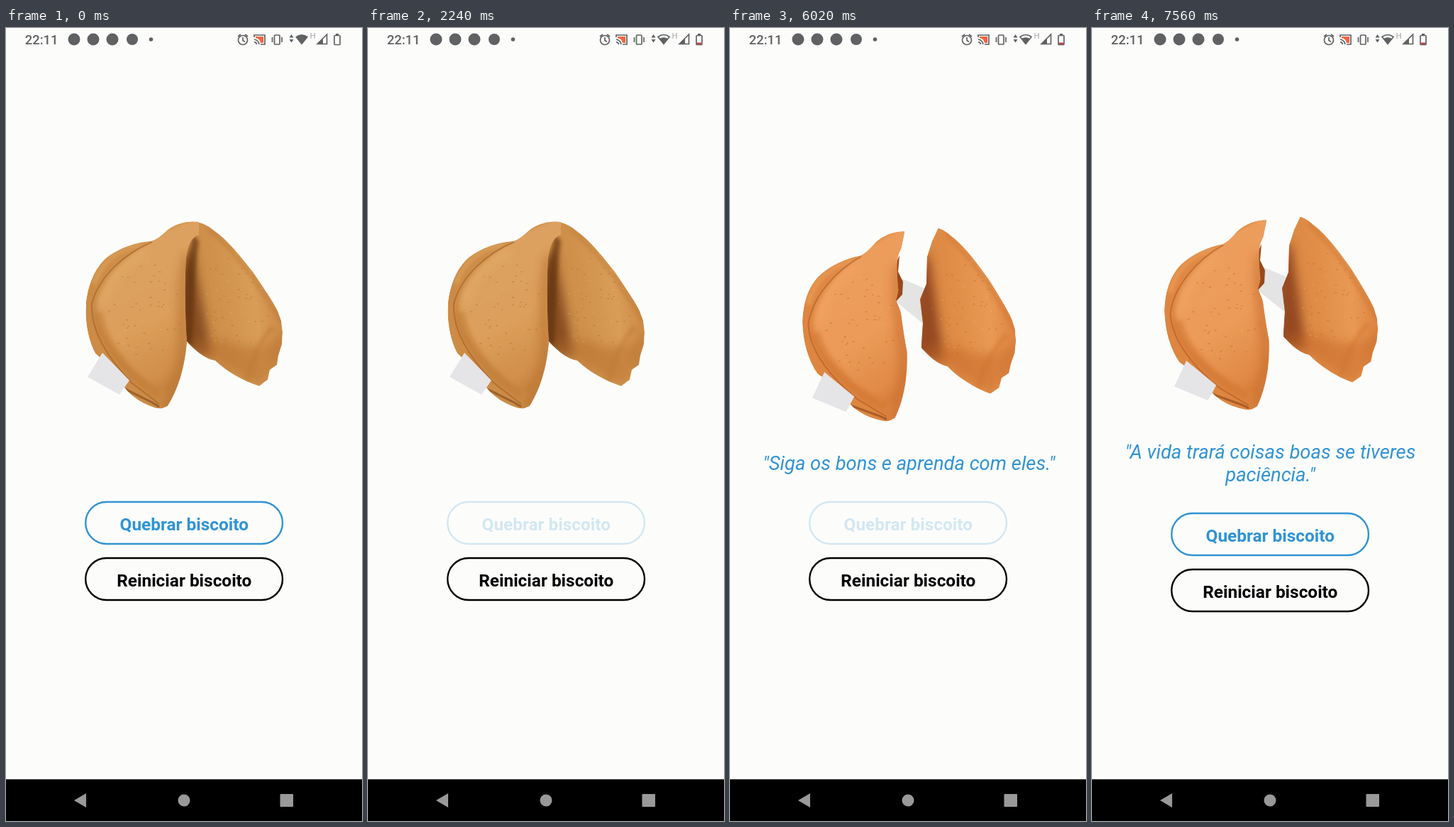
Recreate the animation shown at these times as an HTML page. Size 502x1116 px, loop 8000 ms.

```html
<!DOCTYPE html>
<html lang="pt">
<head>
<meta charset="utf-8">
<title>Biscoito</title>
<style>
  html, body { margin: 0; width: 100%; height: 100%; overflow: hidden; background: #fcfdfb; }
  svg { display: block; width: 100vw; height: 100vh; font-family: Roboto, sans-serif; }
  text { text-anchor: middle; }
  .label { font-size: 24.4px; font-weight: 700; stroke: none; }
  .quote { font-size: 27.4px; font-style: italic; fill: #3093d3; }
  .button rect { fill: none; stroke: currentColor; stroke-width: 2.4; }
  .button text { fill: currentColor; }
  .line { fill: none; stroke: #5f6163; stroke-width: 1.7; }
  #broken { filter: hue-rotate(-6deg) saturate(1.14); }
</style>
</head>
<body>
<svg viewBox="0 0 502 1116">
  <defs>
    <linearGradient id="leftTone" gradientUnits="userSpaceOnUse" x1="150" y1="330" x2="245" y2="520">
      <stop offset="0" stop-color="#dca160"/>
      <stop offset=".45" stop-color="#dc9f5c"/>
      <stop offset=".8" stop-color="#d08f4b"/>
      <stop offset="1" stop-color="#c07a35"/>
    </linearGradient>
    <linearGradient id="rightTone" gradientUnits="userSpaceOnUse" x1="254" y1="390" x2="389" y2="370">
      <stop offset="0" stop-color="#c98a47"/>
      <stop offset=".35" stop-color="#cf914b"/>
      <stop offset=".7" stop-color="#d99d58"/>
      <stop offset="1" stop-color="#ca8743"/>
    </linearGradient>
    <filter id="soft" x="-50%" y="-50%" width="200%" height="200%"><feGaussianBlur stdDeviation="7"/></filter>
    <filter id="crisp" x="-50%" y="-50%" width="200%" height="200%"><feGaussianBlur stdDeviation="2.5"/></filter>

    <path id="leftShape" d="M205 300C185 301 160 309 142 323C124 339 116 362 113 385C111 412 115 437 126 458L136 467L172 512Q185 525 203 532Q215 537 221 535L228 532C243 507 252 480 255 441C252 400 252 350 254 325C256 305 262 294 272 291V273C255 271 240 275 228 284Q215 297 205 300Z"/>
    <path id="rightShape" d="M262 273C275 272 285 278 292 284C314 299 331 322 348 343C363 365 376 384 383 398L388 412L390 428L389 445L384 461L382 474L372 481L369 495L357 504C335 497 310 483 295 468C280 466 265 452 255 441C250 420 247 350 250 320Q256 295 258 275Z"/>
    <clipPath id="leftClip"><use href="#leftShape"/></clipPath>
    <clipPath id="rightClip"><use href="#rightShape"/></clipPath>
    <clipPath id="leftCrack"><path d="M0 200H250L246 287L239 322L236 345L240 361L234 383L244 408L250 432L253 470V600H0Z"/></clipPath>
    <clipPath id="rightCrack"><path d="M300 200L295 279L285 300L278 322L277 360L268 382L272 415L270 446V600H502V200Z"/></clipPath>

    <g id="leftHalf">
      <g clip-path="url(#leftClip)">
        <use href="#leftShape" fill="#cc8b46"/>
        <path d="M222 286C178 314 140 345 129 385C126 420 150 455 180 483Q205 505 228 513L262 440L285 260Z" fill="url(#leftTone)" filter="url(#crisp)"/>
        <path d="M192 304C160 310 135 328 124 360" fill="none" stroke="#dba05c" stroke-width="7" opacity=".8" filter="url(#crisp)"/>
        <path d="M200 314C165 330 142 354 138 388" fill="none" stroke="#e6b06d" stroke-width="12" opacity=".5" filter="url(#soft)"/>
        <path d="M258 320C246 360 250 410 250 450Q244 500 224 537" fill="none" stroke="#b06a2a" stroke-width="13" opacity=".6" filter="url(#soft)"/>
        <path d="M206 301C168 317 131 349 121 388C119 425 142 463 178 500L216 529" fill="none" stroke="#a8662a" stroke-width="2" opacity=".7"/>
        <path d="M130 400C135 440 172 490 216 516" fill="none" stroke="#bd7730" stroke-width="13" opacity=".45" filter="url(#crisp)"/>
        <path d="M166 507L206 527L216 533" fill="none" stroke="#87501f" stroke-width="3" opacity=".7"/>
        <g class="pores" data-x="196" data-y="396"></g>
      </g>
      <path d="M136 457L174 496L160 516L115 491Z" fill="#e5e4e7"/>
    </g>

    <g id="rightHalf" clip-path="url(#rightClip)">
      <use href="#rightShape" fill="url(#rightTone)"/>
      <path d="M246 330L262 310Q276 380 290 462L246 450Z" fill="#7d421a" opacity=".85" filter="url(#soft)"/>
      <path d="M258 440L296 468L360 506L392 465V425Q360 465 310 440Z" fill="#b46d2c" opacity=".5" filter="url(#soft)"/>
      <path d="M285 282C325 316 350 350 389 415" fill="none" stroke="#bf7e3b" stroke-width="6" opacity=".6" filter="url(#crisp)"/>
      <path d="M339 499Q348 455 376 420" fill="none" stroke="#bd7832" stroke-width="7" opacity=".45" filter="url(#crisp)"/>
      <g class="pores" data-x="320" data-y="385"></g>
    </g>
  </defs>

  <rect width="502" height="1116" fill="#fcfdfb"/>

  <g id="status" fill="#5f6163">
    <text x="50.2" y="23.3" font-size="18.4" font-weight="500">22:11</text>
    <circle cx="96" cy="16" r="8.5"/><circle cx="123" cy="16" r="8.5"/>
    <circle cx="150" cy="16" r="8.5"/><circle cx="178" cy="16" r="8"/>
    <circle cx="204.5" cy="16" r="2.8"/>
    <g class="line">
      <circle cx="334" cy="17" r="6.5"/>
      <path d="M334 13V17.5L337 19.5M327 12L331 9M341 12L337 9"/>
      <path d="M350 13V10H365V23H359M350 16Q356 17 357 23M350 19.5Q353 20 353.5 23"/>
      <rect x="378.500" y="10" width="7.5" height="13" rx="1"/>
      <path d="M375.5 13V20M389 13V20"/>
      <rect x="463" y="10.5" width="8" height="13" rx="1"/>
    </g>
    <path d="M352 12H363V21H359Q358 15 352 14Z" fill="#f0663f"/>
    <path d="M399.5 13.5L402.5 9L405.5 13.5ZM399.5 16L402.5 20.5L405.5 16Z"/>
    <path id="wifiFull" d="M408 12.5Q417 5.5 426 12.5L417 23.5Z"/>
    <g id="wifiWeak">
      <path d="M409 12.5Q417 6.5 425 12.5L417 22.5Z" class="line"/>
      <path d="M411 15Q417 11.5 423 15L417 22.5Z"/>
    </g>
    <text x="432.5" y="15" font-size="11.5" font-weight="500" fill="#b5b7b8">H</text>
    <path d="M439 22.5L452.5 9V22.5Z" class="line"/>
    <path d="M439 22.5L447 14.5V22.5Z"/>
    <path d="M465 8H469V10.5H465Z"/>
    <path id="lowBattery" d="M464 20.5H470V23H464Z" fill="#c7443c"/>
  </g>

  <g id="cookie">
    <g id="whole">
      <use href="#rightHalf"/>
      <g clip-path="url(#rightClip)">
        <path d="M264 291C254 330 248 390 250 440L262 446C266 400 264 350 272 300Z" fill="#5c3010" opacity=".65" filter="url(#crisp)"/>
      </g>
      <use href="#leftHalf"/>
    </g>
    <g id="broken">
      <path d="M243 353L278 368V382L272 416L234 385Z" fill="#e3e4e3"/>
      <path d="M239 320L237 343L244 357L243 375L234 385L230 340Z" fill="#8b4c1d"/>
      <g clip-path="url(#leftCrack)"><use href="#leftHalf" transform="translate(-2.5 1) rotate(-6.5 368 474)"/></g>
      <g clip-path="url(#rightCrack)"><use href="#rightHalf" transform="rotate(2.4 105 750)"/></g>
    </g>
  </g>

  <text id="shortQuote" class="quote" x="252.3" y="622">"Siga os bons e aprenda com eles."</text>
  <g id="longQuote" class="quote">
    <text x="251.5" y="606">"A vida trará coisas boas se tiveres</text>
    <text x="251.5" y="638">paciência."</text>
  </g>

  <g id="buttons">
    <g id="breakButton" class="button" color="#3093d3">
      <rect x="112.2" y="667" width="277.8" height="59" rx="29.5"/>
      <text class="label" x="251.3" y="706.5">Quebrar biscoito</text>
    </g>
    <g class="button" color="#000">
      <rect x="112.2" y="746" width="277.8" height="59" rx="29.5"/>
      <text class="label" x="251.3" y="786">Reiniciar biscoito</text>
    </g>
  </g>

  <rect y="1057.3" width="502" height="59"/>
  <g fill="#999">
    <path d="M96 1087L113 1077V1097Z"/>
    <circle cx="251" cy="1087" r="8.5"/>
    <rect x="386.5" y="1078" width="18.5" height="18" rx="1"/>
  </g>
</svg>
<script>
  const LOOP = 8000, FADE = 250, BREAK = 2820, NEXT_QUOTE = 6860;
  const presses = [{ down: 2240, up: 2920 }, { down: 6020, up: 6870 }];
  const get = id => document.getElementById(id);
  const show = (id, on) => get(id).setAttribute('visibility', on ? 'visible' : 'hidden');
  const shift = (id, y) => get(id).setAttribute('transform', `translate(0 ${y})`);
  const easeInOut = p => p < .5 ? 2 * p * p : 1 - 2 * (1 - p) ** 2;

  // Pores lie on a golden-angle spiral around each half's centre.
  for (const group of document.querySelectorAll('.pores')) {
    const { x, y } = group.dataset;
    for (let i = 1; i < 60; i++) {
      const angle = i * 2.4 + Math.sin(i * 7), radius = 9 * Math.sqrt(i);
      const dot = document.createElementNS('http://www.w3.org/2000/svg', 'ellipse');
      const attributes = {
        cx: +x + radius * .75 * Math.cos(angle), cy: +y + radius * Math.sin(angle),
        rx: 1 + i % 3 * .4, ry: .8, fill: i % 3 ? '#b5722f' : '#e8b673', opacity: .55
      };
      for (const name in attributes) dot.setAttribute(name, attributes[name]);
      group.append(dot);
    }
  }

  function buttonOpacity(t) {
    const press = presses.find(p => t >= p.down && t < p.up + FADE);
    return press ? .2 + .8 * easeInOut(Math.max(0, t - press.up) / FADE) : 1;
  }

  function draw(t) {
    const broken = t >= BREAK, long = t >= NEXT_QUOTE;
    show('whole', !broken);
    show('broken', broken);
    show('shortQuote', broken && !long);
    show('longQuote', long);
    shift('cookie', long ? -16 : 0);
    shift('buttons', long ? 16 : 0);
    get('breakButton').setAttribute('opacity', buttonOpacity(t));
    show('wifiFull', t < 980);
    show('wifiWeak', t >= 980);
    show('lowBattery', t >= 20);
  }

  const start = performance.now();
  function tick() {
    draw((performance.now() - start) % LOOP);
    requestAnimationFrame(tick);
  }
  tick();
</script>
</body>
</html>
```
